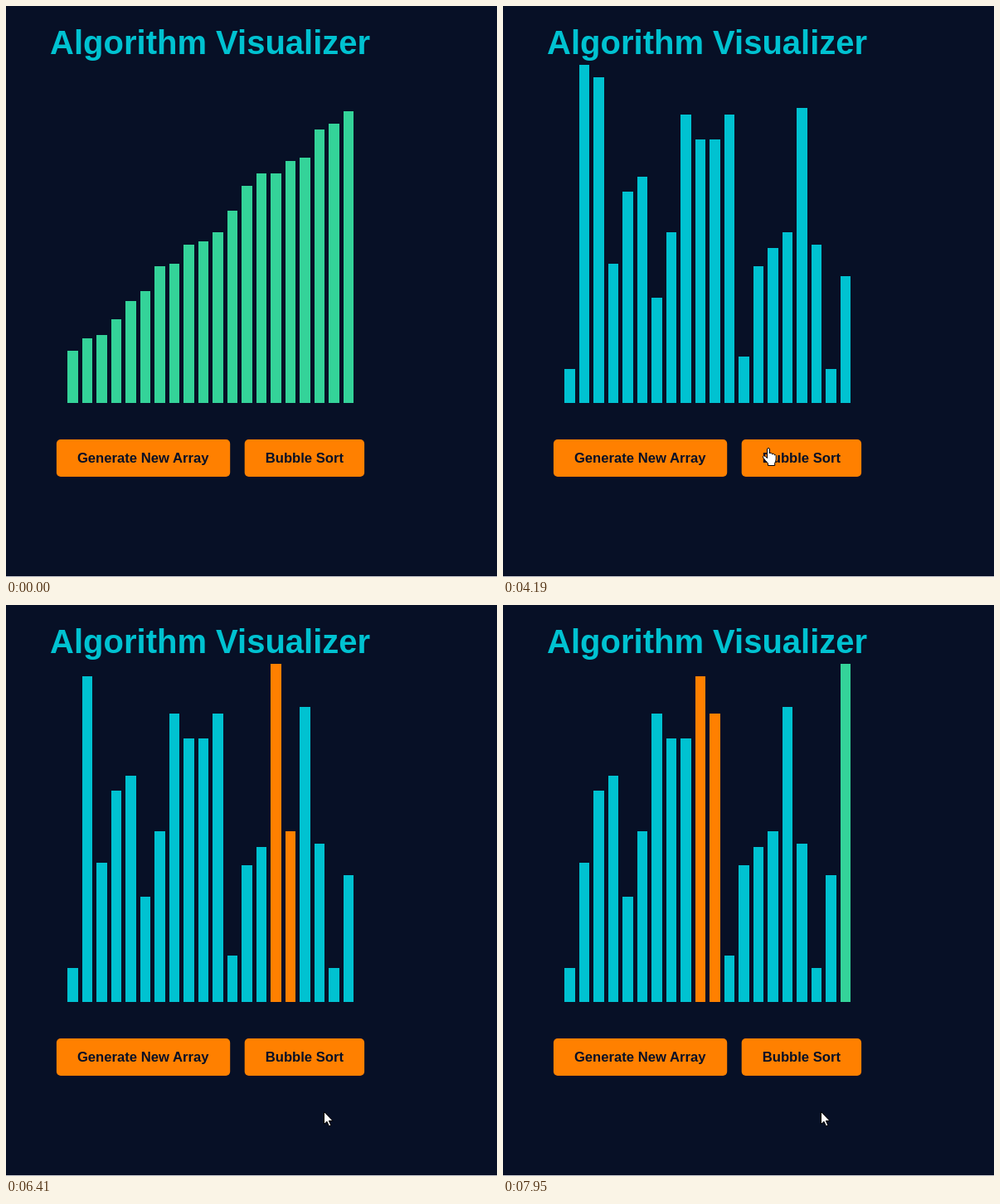
Animation, 592 px wide and 689 px high, one loop 8000 ms. Source, as an HTML page:

```html
<!DOCTYPE html>
<html lang="en">
<head>
<meta charset="utf-8">
<title>Algorithm Visualizer</title>
<style>
  html, body { margin: 0; width: 100%; height: 100%; overflow: hidden; background: #071026; }
  svg { display: block; }
  text { font-family: "Liberation Sans", Arial, sans-serif; font-weight: bold; }
  .button rect { fill: #ff8000; }
  .button text { fill: #071026; font-size: 16.667px; }
  #cursor path { fill: #fff; stroke: #000; stroke-linejoin: round; }
</style>
</head>
<body>
<svg width="592" height="689" viewBox="0 0 592 689">
  <rect y="688" width="592" height="1" fill="#c9cbd0"/>
  <text x="53.1" y="58" font-size="40" fill="#00c2d1">Algorithm Visualizer</text>
  <g id="bars" shape-rendering="crispEdges"></g>
  <g class="button">
    <rect x="60.9" y="523" width="209.3" height="45" rx="5"/>
    <text x="85.9" y="551">Generate New Array</text>
  </g>
  <g class="button">
    <rect x="287.7" y="523" width="144.4" height="45" rx="5"/>
    <text x="312.7" y="551">Bubble Sort</text>
  </g>
  <g id="cursor">
    <path id="arrow" d="M.5 .5V15.5L4 12.3L6.5 17.8L8.8 16.8L6.4 11.4H11Z"/>
    <path id="hand" d="M-.5 2Q-.5 .5 1 .5T2.5 2V7Q3 6 4.3 6.3T5.6 8Q6.2 7 7.4 7.4T8.6 9Q9.6 8.2 10.2 9.4V14Q10 16.5 8.7 18.5V21.5H.5V19Q-2.5 15.5-5 12.5Q-6.4 10.4-4.6 9.7Q-3 9.6-.5 12.7Z"/>
    <circle id="click" r="15" fill="#ff0" fill-opacity=".47"/>
  </g>
</svg>
<script>
const LOOP = 8000, BASE = 479, COUNT = 20, FRAME = 90;
const CYAN = '#00c2d1', ORANGE = '#ff8000', GREEN = '#34d399';
const $ = id => document.getElementById(id);

// Bar tops of the three arrays
const sorted = [416, 401, 397, 378, 356, 344, 314, 311, 288, 284, 273, 247, 217, 202, 202, 187, 183, 149, 142, 127];
const first = [404, 307, 442, 224, 337, 442, 341, 176, 108, 326, 412, 389, 101, 78, 221, 78, 86, 116, 404, 194];
const second = [438, 71, 86, 311, 224, 206, 352, 273, 131, 161, 161, 131, 423, 314, 292, 273, 123, 288, 438, 326];

// When each comparison becomes visible, starting with the pair (1, 2)
const compareTimes = [
  4990, 5170, 5260, 5350, 5530, 5620, 5710, 5800, 5890, 6070, 6070, 6240, 6323, 6407, 6490, 6690, 6780, 6870,
  6960, 7130, 7130, 7310, 7400, 7490, 7670, 7763, 7857, 7950
];

// Mouse moves: start time, then one point per frame
const moves = [
  [720, [[457, 584], [430, 545], [372, 484], [325, 492], [290, 508], [262, 522], [238, 530], [220, 533]]],
  [4190, [[319, 533], [335, 539], [348, 543], [354, 545]]],
  [5530, [[356, 552], [364, 572], [374, 594], [381, 607], [383, 611]]]
];
const clicks = [[1970, 2250], [3480, 3660], [4720, 4990]];

const bars = Array.from({ length: COUNT }, (_, i) => {
  const bar = document.createElementNS('http://www.w3.org/2000/svg', 'rect');
  const x = Math.round(74 + 17.5 * i);
  bar.setAttribute('x', x);
  bar.setAttribute('width', Math.round(86.5 + 17.5 * i) - x);
  return $('bars').appendChild(bar);
});

// Bubble sort up to, but not including, the swap of the current pair
function sortState(t) {
  const tops = [...second];
  const steps = compareTimes.filter(time => time <= t).length;
  if (!steps) return { tops, pair: -9, done: 0 };
  let pair = 0, done = 0;
  for (let k = 0; k < steps; k++) {
    if (tops[pair] < tops[pair + 1]) {
      [tops[pair], tops[pair + 1]] = [tops[pair + 1], tops[pair]];
    }
    if (++pair === COUNT - 1 - done) {
      pair = 0;
      done++;
    }
  }
  return { tops, pair, done };
}

function drawBars(t) {
  const { tops, pair, done } =
    t < 2250 ? { tops: sorted, pair: -9, done: COUNT } :
    t < 3660 ? { tops: first, pair: -9, done: 0 } : sortState(t);
  bars.forEach((bar, i) => {
    const active = i === pair || i === pair + 1;
    bar.setAttribute('y', tops[i]);
    bar.setAttribute('height', BASE - tops[i]);
    bar.setAttribute('fill', active ? ORANGE : i >= COUNT - done ? GREEN : CYAN);
  });
}

function show(id, visible) {
  $(id).style.display = visible ? '' : 'none';
}

function drawCursor(t) {
  const move = moves.filter(([start]) => start <= t).pop();
  show('cursor', move);
  if (!move) return;
  const [start, points] = move;
  const [x, y] = points[Math.min(points.length - 1, Math.floor((t - start) / FRAME))];
  const overButton = y >= 523 && y < 568 && (x > 60 && x < 270 || x > 287 && x < 432);
  $('cursor').setAttribute('transform', `translate(${x} ${y})`);
  show('hand', overButton);
  show('arrow', !overButton);
  show('click', clicks.some(([from, to]) => t >= from && t < to));
}

function draw() {
  const t = performance.now() % LOOP;
  drawBars(t);
  drawCursor(t);
  requestAnimationFrame(draw);
}
draw();
</script>
</body>
</html>
```
